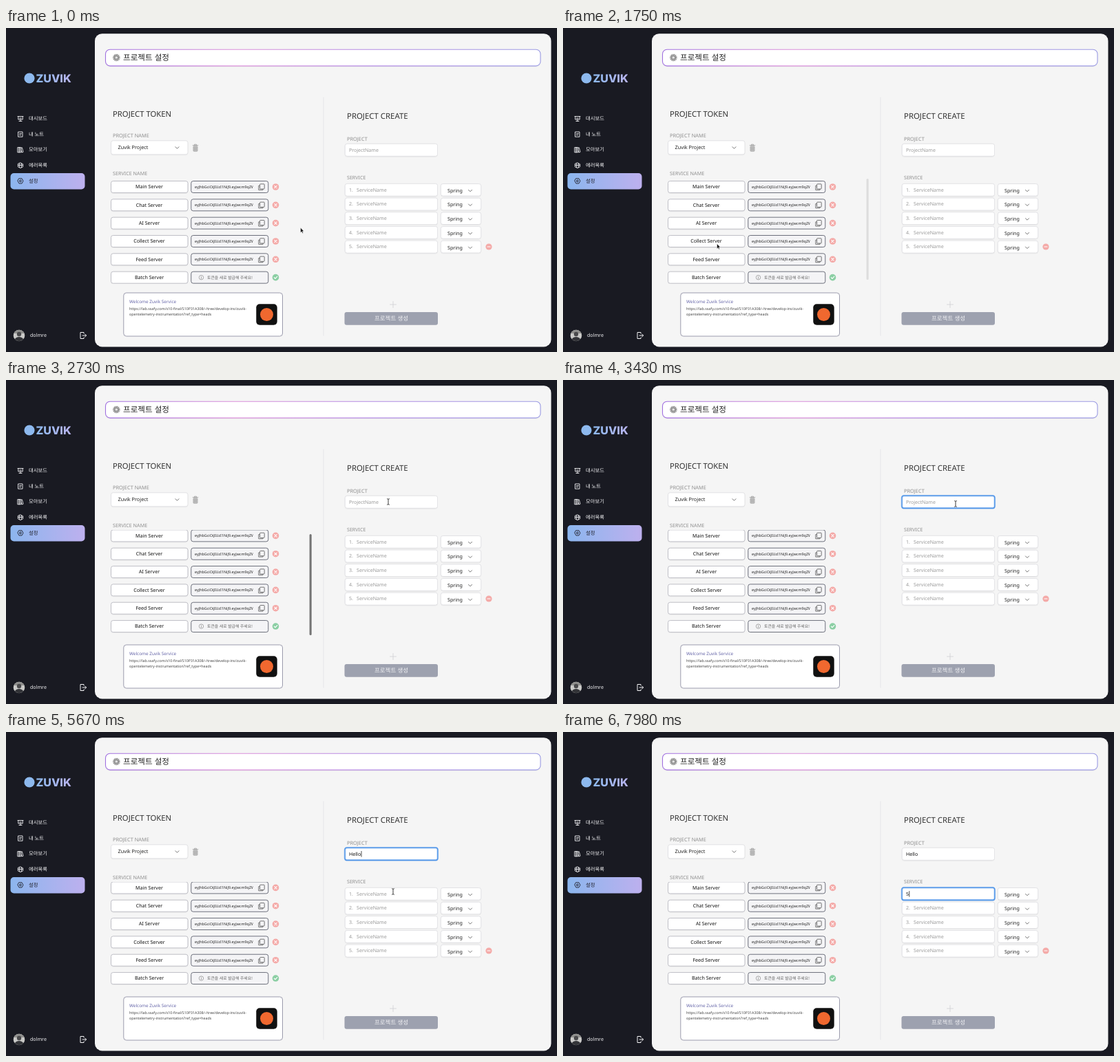
An HTML page that plays this animation: 800 px wide and 471 px high, repeating every 8 s.

```html
<!DOCTYPE html>
<html lang="ko">
<head>
<meta charset="utf-8">
<title>프로젝트 설정</title>
<style>
  html, body { margin: 0; width: 100%; height: 100%; overflow: hidden; background: #191a22; }
  svg { display: block; width: 100vw; height: 100vh; }
  text {
    font-family: "Noto Sans", "Noto Sans CJK KR", "Noto Sans CJK", sans-serif;
    text-rendering: geometricPrecision; white-space: pre;
  }
</style>
</head>
<body>
<svg id="stage" viewBox="0 0 800 471">
  <defs>
    <linearGradient id="brand"><stop stop-color="#8db9ee"/><stop offset="1" stop-color="#b9b5f0"/></linearGradient>
    <linearGradient id="active"><stop stop-color="#8cb6ee"/><stop offset="1" stop-color="#bdb0ee"/></linearGradient>
    <linearGradient id="edge">
      <stop stop-color="#a070e0"/><stop offset=".3" stop-color="#dc90da"/>
      <stop offset=".6" stop-color="#b48ae4"/><stop offset="1" stop-color="#9c9ce4"/>
    </linearGradient>
    <filter id="soft" x="-5%" y="-20%" width="110%" height="150%">
      <feDropShadow dx="0" dy=".6" stdDeviation=".7" flood-opacity=".09"/>
    </filter>
    <clipPath id="listClip"><rect x="148" y="218" width="260" height="154"/></clipPath>
    <clipPath id="tokenClip"><rect x="270" y="0" width="88.5" height="471"/></clipPath>
    <clipPath id="avatarClip"><circle cx="19" cy="447" r="8.3"/></clipPath>
  </defs>
  <rect width="800" height="471" fill="#191a22"/>
  <rect x="129" y="8.2" width="662.5" height="455.2" rx="10.5" fill="#f5f5f5"/>
  <g id="page"></g>
  <g id="list" clip-path="url(#listClip)"><g id="rows"></g></g>
  <rect id="bar" x="440.6" width="3.1" height="147" rx="1.5" fill="#757575"/>
  <g id="form"></g>
  <rect id="caret" width=".8" height="8.6" fill="#222"/>
  <path id="arrow" d="M0 0V7.4L1.7 5.9L2.8 8.3L3.9 7.8L2.9 5.4H5Z" fill="#111" stroke="#fff" stroke-width=".5"/>
  <path id="beam" d="M-1.8 -4.3Q0 -4.3 0 -3.4Q0 -4.3 1.8 -4.3M0 -3.4V3.4M-1.8 4.3Q0 4.3 0 3.4Q0 4.3 1.8 4.3" fill="none" stroke="#222" stroke-width=".9"/>
</svg>
<script>
const $ = id => document.getElementById(id);

// Markup helpers; text is placed by its vertical middle.
const text = (x, y, size, str, fill = '#222', more = '') =>
  `<text x="${x}" y="${y + size * 0.36}" font-size="${size}" fill="${fill}" ${more}>${str}</text>`;
const box = (x, y, w, h, r, fill, stroke = 'none', more = '') =>
  `<rect x="${x}" y="${y}" width="${w}" height="${h}" rx="${r}" fill="${fill}" stroke="${stroke}" ${more}/>`;
const line = (d, stroke, width = 0.9, more = '') =>
  `<path d="${d}" fill="none" stroke="${stroke}" stroke-width="${width}" stroke-linecap="round" stroke-linejoin="round" ${more}/>`;
const dot = (x, y, r, fill, more = '') => `<circle cx="${x}" cy="${y}" r="${r}" fill="${fill}" ${more}/>`;
const chevron = (x, y) => line(`M${x - 2.5} ${y - 1.2}l2.5 2.5l2.5 -2.5`, '#666');
const middle = 'text-anchor="middle"';
const soft = 'filter="url(#soft)"';
const thin = 'stroke-width=".8"';
const MUTED = '#8f8f8f', HINT = '#9a9a9a', FIELD_EDGE = '#dcdce0';

function sidebar() {
  const icons = [
    'M-4 -3.5H4M-3.2 -3.5V1H3.2V-3.5M0 1V3.5M-2 3.5H2M-1.2 -1H1.2',
    'M-3 -3.6H3V3.6H-3ZM-1.4 -1H1.4M-1.4 1H.4',
    'M-3.8 -3.6H-1.6V3.6H-3.8ZM-1.6 -3.6H.6V3.6H-1.6ZM.6 -2.8L2.4 -3.3L4 3L2.2 3.6Z',
    'M0 -3.8L3.6 -2V2L0 3.8L-3.6 2V-2ZM-3.6 -.4H3.6M-1.4 -2.8V2.8M1.4 -2.8V2.8',
    'M-2 -3.6H2L4 0L2 3.6H-2L-4 0ZM-1.4 0A1.4 1.4 0 1 0 1.4 0A1.4 1.4 0 1 0 -1.4 0'
  ];
  const labels = ['대시보드', '내 노트', '모아보기', '에러목록', '설정'];
  let out = dot(34, 73, 7.6, '#8db9ee') +
    text(43.5, 73, 16, 'ZUVIK', 'url(#brand)', 'style="font-family:Inter,sans-serif" font-weight="800"') +
    box(6.5, 211, 108, 23.5, 5, 'url(#active)');
  labels.forEach((label, i) => {
    const y = 132 + i * 22.6, color = i === 4 ? '#22232c' : '#f4f4f6';
    out += line(icons[i], color, 0.9, `transform="translate(21 ${y})"`) +
      text(33, y - 0.4, 7.3, label, color, 'font-weight="500"');
  });
  return out +
    `<g clip-path="url(#avatarClip)">${dot(19, 447, 9, '#c9c9c7')}${box(10, 438, 18, 6, 0, '#8f8f8d')}
      ${dot(19, 445, 3.2, '#4a4a4c')}<ellipse cx="19" cy="455" rx="7" ry="6" fill="#333438"/></g>` +
    text(35, 446.5, 7.1, 'dolmre', '#f4f4f6', 'font-weight="500"') +
    line('M113 444V442.5H108V451.5H113V450M111 447H116.5M114.6 445l2 2l-2 2', '#f4f4f6', 1);
}

function header() {
  return box(144.5, 31.3, 631.5, 23.8, 6.5, '#fff', 'url(#edge)', `stroke-width="1.1" ${soft}`) +
    dot(160.3, 43, 4.6, 'none', 'stroke="#777" stroke-width="1.3" stroke-dasharray="1.3 .9"') +
    dot(160.3, 43, 3.4, '#aaa', 'stroke="#777" stroke-width=".9"') + dot(160.3, 43, 1.3, '#eee') +
    text(170, 42.8, 11.6, '프로젝트 설정');
}

function tokenSide() {
  return text(155, 125.1, 11.3, 'PROJECT TOKEN', '#333') +
    text(155, 156.8, 7.4, 'PROJECT NAME', MUTED) +
    box(152.5, 163.8, 111.5, 20, 3, '#fff', FIELD_EDGE, `${thin} ${soft}`) +
    text(162.5, 173.3, 7.3, 'Zuvik Project') + chevron(248.5, 174) +
    line('M271.2 170.6H278.8M273.5 170.4V169.2H276.5V170.4', '#a2a2a2', 0.9) +
    box(272, 171.8, 6, 7.4, 0.8, '#c4c4c4', '#a2a2a2', thin) +
    line('M274 173.5V177.6M276 173.5V177.6', '#8f8f8f', 0.5) +
    text(155, 211.8, 7.2, 'SERVICE NAME', MUTED) +
    line('M461 101V447', '#e5e5e8', 0.9) +
    box(170.8, 385, 230.7, 63, 4, '#fff', '#85859a', thin) +
    text(179, 397.5, 6.4, 'Welcome Zuvik Service', '#6565a8', 'font-weight="500"') +
    text(179, 408.3, 5.3, 'https://lab.ssafy.com/s10-final/S10P31A308/-/tree/develop-ins/zuvik-', '#444') +
    text(179, 415.8, 5.3, 'opentelemetry-instrumentation?ref_type=heads', '#444') +
    box(363.3, 401.3, 30.4, 30.4, 5, '#111') + dot(378.5, 416.5, 9.5, '#f0682f');
}

function serviceRows() {
  const names = ['Main', 'Chat', 'AI', 'Collect', 'Feed', 'Batch'];
  return names.map((name, i) => {
    const y = 231 + i * 26.33, last = i === 5;
    const tokenBox = box(268.8, y - 8.5, 112, 17, 3, '#f4f4f6', '#666975', 'stroke-width=".95"');
    const content = last
      ? dot(283.5, y, 3.2, 'none', `stroke="#777" stroke-width=".6"`) + line(`M283.5 ${y}v1.5M283.5 ${y - 1.5}v.1`, '#777', 0.7) +
        text(292, y, 5.9, '토큰을 새로 발급해 주세요!', '#666')
      : text(274, y, 5.4, 'eyJhbGciOiJIUzI1NiJ9.eyJwcm9qZW', '#222', 'clip-path="url(#tokenClip)"') +
        line(`M367.8 ${y - 1.8}H366.8V${y + 4.4}H373V${y + 3.2}`, '#555', 0.8) +
        box(368.6, y - 4.2, 6.6, 7.2, 0.8, '#f4f4f6', '#555', thin);
    const badge = last
      ? dot(391.5, y, 4.8, '#8ccfa4') + line(`M389.3 ${y}l1.6 1.7l3 -3.2`, '#fff', 1.1)
      : dot(391.5, y, 4.8, '#f4aaa8') + line(`M389.8 ${y - 1.7}l3.4 3.4M393.2 ${y - 1.7}l-3.4 3.4`, '#fff', 1.1);
    return box(152.5, y - 8.5, 111.5, 17, 3, '#fff', '#b2b2ba', `${thin} ${soft}`) +
      text(208, y - 0.2, 7.1, name + ' Server', '#111', middle) + tokenBox + content + badge;
  }).join('');
}

const field = (id, y, hint) =>
  box(492.2, y - 9, 134.4, 18, 3, '#fff', FIELD_EDGE, `${thin} ${soft}`) +
  box(492, y - 9.1, 134.8, 18.2, 3, 'none', '#8fbdf4', `id="${id}Halo" stroke-width="2.6"`) +
  box(492, y - 9.1, 134.8, 18.2, 3, 'none', '#4f94e6', `id="${id}Ring" stroke-width="1.2"`) +
  `<g id="${id}Hint">${hint}</g>` + text(498, y - 0.2, 7.1, '', '#111', `id="${id}Text"`);

function createSide() {
  let out = text(495, 128.1, 11.4, 'PROJECT CREATE', '#333') +
    text(495, 161.6, 7.4, 'PROJECT', MUTED) +
    field('project', 177.3, text(498, 177, 7.05, 'ProjectName', HINT)) +
    text(495, 217.6, 7.1, 'SERVICE', MUTED);
  for (let i = 0; i < 5; i++) {
    const y = 235.3 + i * 20.7;
    out += field('service' + i, y, text(498, y - 0.2, 7.1, i + 1 + '.', HINT) + text(509, y - 0.2, 7.1, 'ServiceName', HINT)) +
      box(631.3, y - 8.8, 58.4, 17.6, 3, '#fff', FIELD_EDGE, `${thin} ${soft}`) +
      text(641, y + 0.9, 7.1, 'Spring', '#222') + chevron(674, y + 1.2);
  }
  return out + dot(701, 318, 4.6, '#f4aaa8') + line('M699 318H703', '#fff', 1.1) +
    line('M562 397.5V406.5M557.5 402H566.5', '#d0d0d4', 0.8) +
    box(491.5, 413, 135.5, 18.8, 3, '#9da1af') +
    text(559.5, 422, 8.5, '프로젝트 생성', '#f1f1f4', middle);
}

$('page').innerHTML = sidebar() + header() + tokenSide();
$('rows').innerHTML = serviceRows();
$('form').innerHTML = createSide();

const LOOP = 8000, STEP = 70;
const PROJECT_FOCUS = 2870, SERVICE_FOCUS = 5740, SERVICE_KEY = 7980;
const pointerPath = [
  [70, 427.6, 290.2], [490, 250, 308], [700, 250, 308], [1050, 223.5, 313.5], [2240, 223.5, 313.5],
  [2730, 555, 177], [2800, 555, 177], [3080, 570, 180], [4900, 570, 180], [5600, 562, 232]
];
const keys = [[3780, 'H'], [3920, 'He'], [4130, 'Hel'], [4270, 'Hell'], [4480, 'Hello']];
const scroll = [[1750, 0], [1820, 1.9], [1890, 3.8], [2030, 4.6]];
const barFade = [[1680, 0], [1750, 0.18], [1820, 0.7], [1890, 1], [2800, 1], [3080, 0]];
const caretOff = [[3430, 3780], [4690, 5320], [6300, 6930], [7560, SERVICE_KEY]];

const within = (t, [from, to]) => t >= from && t < to;
const clamp = v => Math.min(1, Math.max(0, v));
const ramp = (t, start) => clamp((t - start + STEP) / 210);

// Values between timed points, with optional easing.
function follow(points, t, ease = u => u) {
  const next = points.findIndex(p => p[0] > t);
  if (next === 0) return points[0].slice(1);
  if (next < 0) return points.at(-1).slice(1);
  const a = points[next - 1], b = points[next], u = ease((t - a[0]) / (b[0] - a[0]));
  return a.slice(1).map((v, i) => v + (b[i + 1] - v) * u);
}

function show(el, visible) { el.style.display = visible ? '' : 'none'; }

function setField(id, value, focus) {
  $(id + 'Text').textContent = value;
  show($(id + 'Hint'), !value);
  $(id + 'Halo').style.opacity = focus * 0.75;
  $(id + 'Ring').style.opacity = focus;
}

function draw(t) {
  const [offset] = follow(scroll, t);
  $('rows').setAttribute('transform', `translate(0 ${-offset})`);
  $('bar').setAttribute('y', 219 + offset * 1.09);
  $('bar').style.opacity = follow(barFade, t)[0];

  const typed = keys.findLast(k => t >= k[0])?.[1] ?? '';
  const serviceFocus = ramp(t, SERVICE_FOCUS);
  setField('project', typed, ramp(t, PROJECT_FOCUS) * (1 - serviceFocus));
  setField('service0', t >= SERVICE_KEY ? '5' : '', serviceFocus);
  const inService = t >= SERVICE_FOCUS;
  const active = $(inService ? 'service0Text' : 'projectText');
  const width = active.textContent ? active.getComputedTextLength() : 0;
  $('caret').setAttribute('x', 498.4 + width);
  $('caret').setAttribute('y', inService ? 231.1 : 173);
  show($('caret'), t >= PROJECT_FOCUS && !caretOff.some(range => within(t, range)));

  const [x, y] = follow(pointerPath, t, u => u * u * (3 - 2 * u));
  const hidden = within(t, [3780, 4970]) || t >= SERVICE_KEY;
  const overField = within(x, [492, 627]) && (within(y, [168, 187]) || within(y, [226, 245]));
  for (const [id, visible] of [['arrow', !overField], ['beam', overField]]) {
    $(id).setAttribute('transform', `translate(${x} ${y})`);
    show($(id), visible && !hidden);
  }
}

for (let i = 1; i < 5; i++) setField('service' + i, '', 0);

function frame() {
  const t = performance.now() % LOOP;
  draw(Math.floor(t / STEP) * STEP);
  requestAnimationFrame(frame);
}
frame();
</script>
</body>
</html>
```
